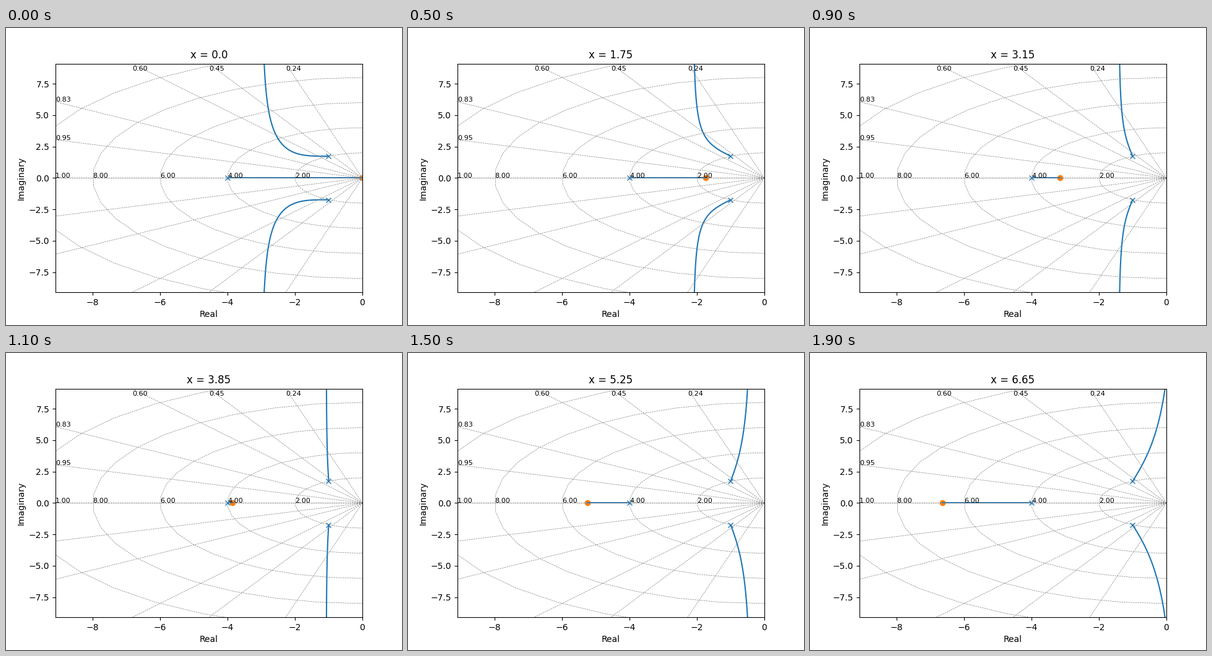
Animation, 640 px wide and 480 px high, one loop 2000 ms. Source, as a matplotlib script:

```python
import numpy as np
import matplotlib.pyplot as plt
from matplotlib.animation import FuncAnimation

FRAMES, INTERVAL = 20, 100
STEP = 0.35
LIMIT = 9.1
GRID_END = -10
DEN = np.array([1, 6, 12, 16])  # (s + 4)(s^2 + 2s + 4)
GAINS = np.concatenate(([0], np.geomspace(0.01, 1e5, 500)))

fig, ax = plt.subplots(figsize=(6.4, 4.8), dpi=100)


def locus(zero):
    """Closed-loop roots for every gain, one column per branch."""
    rows = []
    for k in GAINS:
        roots = np.roots(DEN + k * np.array([0, 0, 1, zero]))
        rows.append(roots[np.argsort(roots.imag)])
    return np.array(rows)


def grid_line(x, y):
    ax.plot(x, y, color="gray", linestyle="dashed", linewidth=0.5)


def label(value, x, y):
    ax.annotate(f"{value:.2f}", xy=(x, y), fontsize=8)


def draw_grid():
    # Lines of constant damping
    angles = np.arctan([0.25, 0.5, 0.75, 1.5, 3, np.inf])
    for angle in angles:
        slope = np.tan(np.pi / 2 + angle)
        for sign in (1, -1):
            grid_line([0, GRID_END], [0, sign * slope * GRID_END])
        if angle < np.pi / 4:
            label(np.sin(angle), LIMIT / slope, 0.94 * LIMIT)
        else:
            label(np.sin(angle), -LIMIT, -slope * LIMIT)
    grid_line([0, 0], [-LIMIT, LIMIT])

    # Curves of constant natural frequency
    theta = np.linspace(-np.pi / 2, np.pi / 2, 20)
    for wn in range(-GRID_END, 0, -2):
        grid_line(-wn * np.cos(theta), wn * np.sin(theta))
        if wn < LIMIT:
            label(wn, -wn, 0)


poles = np.roots(DEN)
ax.plot(poles.real, poles.imag, "x", color="C0")
zero_mark, = ax.plot([], [], "o", color="C1")
branches = [ax.plot([], [], color="C0")[0] for _ in poles]
draw_grid()
ax.set(xlim=(-LIMIT, 0), ylim=(-LIMIT, LIMIT),
       xlabel="Real", ylabel="Imaginary")
title = ax.set_title("")


def update(i):
    x = round(STEP * i, 2)
    zero_mark.set_data([-x], [0])
    for line, roots in zip(branches, locus(x).T):
        line.set_data(roots.real, roots.imag)
    title.set_text(f"x = {x}")
    return [zero_mark, title, *branches]


anim = FuncAnimation(fig, update, frames=FRAMES, interval=INTERVAL,
                     init_func=lambda: update(0), repeat=True,
                     repeat_delay=0, blit=False)
plt.show()
```
